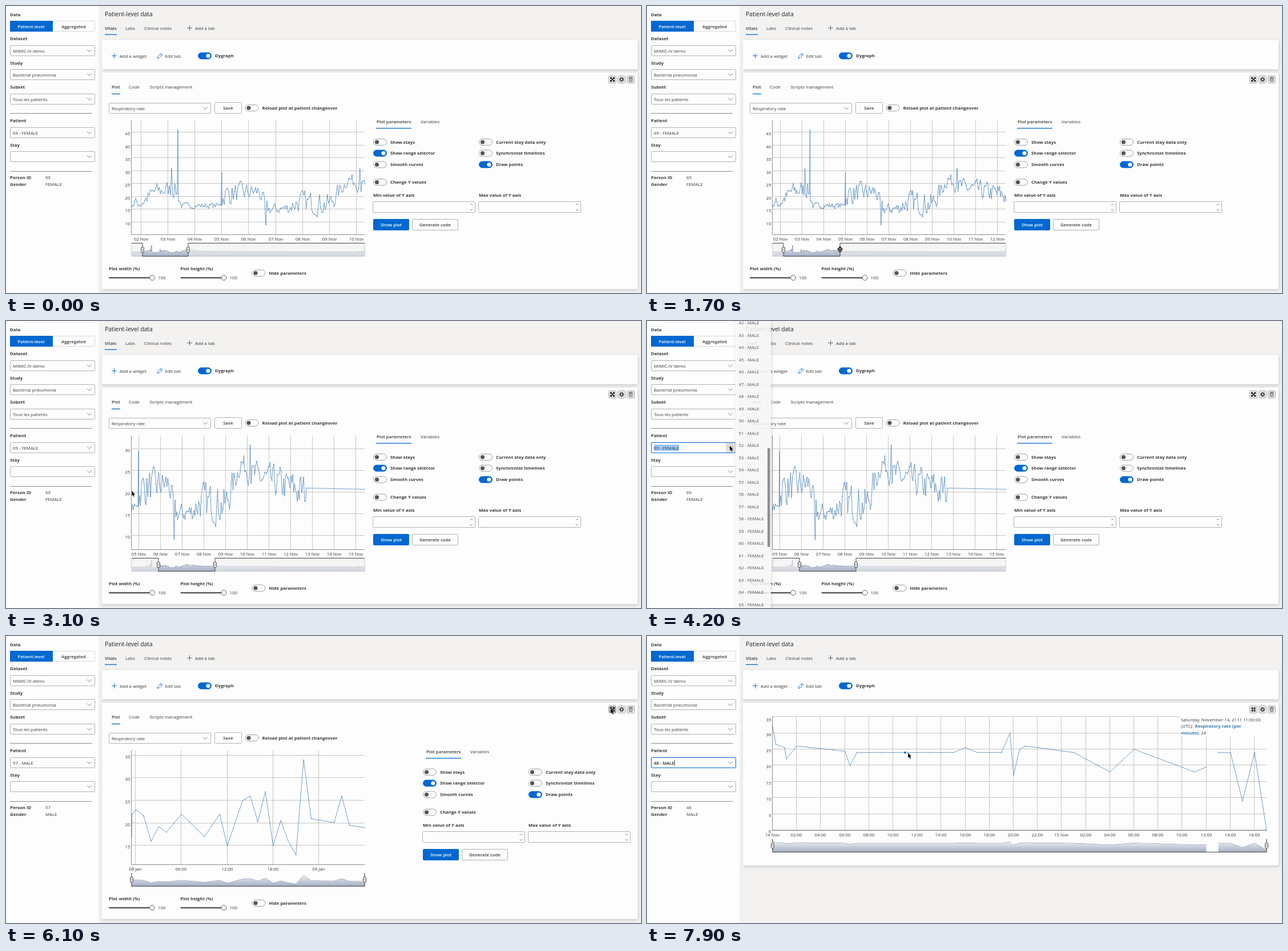
An HTML page with a canvas that plays this animation: 1112 by 504 pixels, repeating every 8000 ms.

```html
<!DOCTYPE html>
<html lang="en">
<head>
<meta charset="utf-8">
<title>Patient-level data</title>
<style>
html, body { margin: 0; overflow: hidden; }
canvas { display: block; }
</style>
</head>
<body>
<canvas width="1112" height="504"></canvas>
<script>
const ctx = document.querySelector('canvas').getContext('2d');
const INK = '#3b3a39', BLUE = '#0068d0', LINE = '#b2b1ae', PAPER = '#fdfdfd', SERIES = '#3478b6';
const LOOP = 8000, STEP = 100;

// Drawing helpers
function text(s, x, y, weight = 400, color = INK, align = 'left', size = 7.8) {
  ctx.font = `${weight} ${size}px "Open Sans", "Noto Sans", sans-serif`;
  ctx.fillStyle = color;
  ctx.textAlign = align;
  ctx.fillText(s, x, y + size * .36);
}
const bold = (s, x, y, color) => text(s, x, y, 700, color);
const semi = (s, x, y) => text(s, x, y, 600);
function rect(x, y, w, h, fill, stroke, radius = 0) {
  ctx.beginPath();
  ctx.roundRect(x, y, w, h, radius);
  if (fill) { ctx.fillStyle = fill; ctx.fill(); }
  if (stroke) { ctx.strokeStyle = stroke; ctx.stroke(); }
}
function lines(color, width, ...paths) {
  ctx.strokeStyle = color;
  ctx.lineWidth = width;
  ctx.beginPath();
  for (const p of paths)
    for (let i = 0; i < p.length; i += 2) ctx[i ? 'lineTo' : 'moveTo'](p[i], p[i + 1]);
  ctx.stroke();
  ctx.lineWidth = 1;
}
function dot(x, y, r, fill, stroke) {
  ctx.beginPath();
  ctx.arc(x, y, r, 0, 7);
  if (fill) { ctx.fillStyle = fill; ctx.fill(); }
  if (stroke) { ctx.strokeStyle = stroke; ctx.stroke(); }
}
function card(x, y, w, h) {
  ctx.save();
  ctx.shadowColor = 'rgba(0,0,0,.16)';
  ctx.shadowBlur = 5;
  ctx.shadowOffsetX = 1;
  ctx.shadowOffsetY = 2;
  rect(x, y, w, h, PAPER);
  ctx.restore();
}
const chevron = (x, y, s = 4, d = 1) =>
  lines('#605e5c', .8, [x - s, y - s * d / 2, x, y + s * d / 2, x + s, y - s * d / 2]);
const underline = (x, y, w) => rect(x, y, w, 1.3, BLUE);
const plus = (x, y, color) => lines(color, .9, [x - 4.5, y, x + 4.5, y], [x, y - 4.5, x, y + 4.5]);
function combo(x, y, w, value) {
  rect(x + .5, y + .5, w - 1, 18, PAPER, LINE, 1);
  text(value, x + 5, y + 9.7);
  chevron(x + w - 10, y + 9.5);
}
function button(s, x, y, w, primary) {
  rect(x + .5, y + .5, w - 1, 19, primary ? BLUE : PAPER, primary ? BLUE : LINE, 1);
  text(s, x + w / 2, y + 10, 600, primary ? '#fff' : INK, 'center');
}
function toggle(x, y, on, label) {
  rect(x + .5, y - 5.5, 23, 11, on ? BLUE : PAPER, on ? BLUE : '#a09f9d', 5.5);
  dot(x + (on ? 18 : 6.5), y, 3.6, on ? '#fff' : '#555');
  bold(label, x + 30, y);
}
function slider(x, label) {
  bold(label, x, 461);
  rect(x, 476, 72, 2.4, '#605e5c', null, 1);
  dot(x + 76, 477.2, 4.4, PAPER, '#605e5c');
  text('100', x + 86, 477.5);
}

// Motion helpers
const ramp = (t, a, b) => Math.min(1, Math.max(0, (t - a) / (b - a)));
// Linear interpolation through [position, ...values] keys
function track(keys, t) {
  const i = keys.findIndex(k => k[0] > t);
  if (i === 0) return keys[0].slice(1);
  if (i < 0) return keys.at(-1).slice(1);
  const a = keys[i - 1], b = keys[i], f = ramp(t, a[0], b[0]);
  return a.slice(1).map((v, j) => v + (b[j + 1] - v) * f);
}

// Hourly rates: a trend of [hour, mean, swing] with seeded noise, plus single peaks
let seed = 7;
const noise = () => (seed = seed * 16807 % 2147483647) / 1073741823.5 - 1;
function series(from, to, trend, peaks = {}) {
  const points = new Map();
  let drift = 0;
  for (let h = from; h <= to; h++) {
    const [mean, swing = 0] = track(trend, h);
    drift = drift * .3 + noise();
    points.set(h, mean + drift * swing);
  }
  for (const h in peaks) points.set(+h, peaks[h]);
  return [...points].sort((a, b) => a[0] - b[0]);
}
const patients = {
  69: { sex: 'FEMALE', day: 2, month: 'Nov', domain: [-58, 1002], parts: [[
    ...series(-58, 257, [[-58, 17, 3], [0, 17.5, 2], [12, 22, 3], [30, 23, 3], [36, 16.5, 1], [69, 16.5, 1],
      [75, 21, 4], [105, 22, 3], [113, 15, 2], [131, 15.5, 2], [140, 18, 4], [168, 17, 4],
      [185, 27, 2], [198, 24, 3], [256, 20, 4], [257, 21, 0]],
      { 27: 31, 32.6: 46, 71.8: 29.5, 111: 9, 195: 31 }),
    ...series(960, 1002, [[960, 18, 0], [965, 18, 4]])]] },
  57: { sex: 'MALE', day: 8, month: 'Jan', domain: [-.547, 30], parts: [
    series(0, 30, [[0, 23], [4, 18], [6, 22], [9, 17], [11, 22], [13, 20], [23, 21], [30, 19]],
      { '-0.547': 17, '-0.48': 22, 2: 16, 12: 15, 14: 25, 15: 26, 17: 27, 18: 15, 20: 16, 21: 13, 22: 34, 27: 26 })] },
  46: { sex: 'MALE', day: 14, month: 'Nov', domain: [0, 41], parts: [
    series(0, 36, [[0, 25], [2, 26], [7, 24], [19, 24], [21, 26], [25, 24], [28, 18], [30, 25], [35, 18], [36, 19.5]],
      { 0: 32, .27: 26.5, 1.14: 22, 6.42: 20, 16: 25.5, 19.7: 30, 20: 17, 20.5: 25 }),
    series(37, 41, [[38, 24], [39, 9], [40, 24], [41, 0]])] }
};
const extent = a => [Math.min(...a), Math.max(...a)];
const two = n => String(n).padStart(2, '0');

const pointer = [[1000, 335, 385], [1200, 319, 426], [1700, 338, 427], [1900, 317, 430], [2265, 345, 430],
  [3600, 145, 219], [4300, 145, 219], [5000, 172, 325], [6100, 1059, 127], [6600, 145, 220],
  [7000, 149, 328], [7200, 170, 345], [7900, 457, 205]];
// The right handle is dragged out first, then the whole window is panned
function rangeWindow(t) {
  const grow = 19 * ramp(t, 1200, 1700), pan = 28 * ramp(t, 1900, 2265);
  return [239 + pan, 319 + grow + pan];
}

function chart(p, x, y, w, [left, right], tick, hover) {
  const H = 200, [d0, d1] = p.domain;
  const hourAt = px => d0 + (px - x) / w * (d1 - d0);
  const from = hourAt(left), to = hourAt(right);
  const all = p.parts.flat(), seen = all.filter(d => d[0] >= from - 1 && d[0] <= to + 1).map(d => d[1]);
  const [min, max] = extent(seen), pad = (max - min) * .1;
  const lo = Math.max(0, min - pad), hi = max + pad;
  const X = h => x + (h - from) / (to - from) * w, Y = v => y + H - (v - lo) / (hi - lo) * H;

  for (let v = Math.ceil(lo / 5) * 5; v <= hi; v += 5) {
    const gy = Math.round(Y(v)) - .5;
    lines('#c6c6c1', 1, [x, gy, x + w, gy]);
    text(v, x - 2.5, Math.max(y + 6, gy + 2.5), 400, INK, 'right');
  }
  for (let h = Math.ceil(from / tick) * tick; h < to; h += tick) {
    const gx = Math.round(X(h)) - .5;
    lines('#c6c6c1', 1, [gx, y, gx, y + H]);
    const label = h % 24 ? two(h % 24) + ':00' : `${two(p.day + h / 24)} ${p.month}`;
    text(label, gx, y + H + 8.5, 400, INK, 'center');
  }
  lines('#8d8c94', 1, [x - .5, y, x - .5, y + H + .5, x + w, y + H + .5]);

  ctx.save();
  ctx.beginPath();
  ctx.rect(x - 1, y, w + 2, H + 1);
  ctx.clip();
  for (const part of p.parts) {
    lines(SERIES, .7, part.flatMap(([h, v]) => [X(h), Y(v)]));
    for (const [h, v] of part) dot(X(h), Y(v), .6, SERIES);
  }
  ctx.restore();

  // Range selector
  const top = y + 215.5, bottom = y + 238.5, [vMin, vMax] = extent(all.map(d => d[1]));
  const extra = (vMax - vMin) / 4;
  const mx = h => x + (h - d0) / (d1 - d0) * w;
  const my = v => bottom - (v - vMin + extra) / (vMax - vMin + 2 * extra) * (bottom - top);
  const shade = ctx.createLinearGradient(0, top, 0, bottom);
  shade.addColorStop(0, '#fff');
  shade.addColorStop(1, '#a2adc2');
  for (const part of p.parts) {
    lines('#7487a8', 1, part.flatMap(([h, v]) => [mx(h), my(v)]));
    ctx.lineTo(mx(part.at(-1)[0]), bottom);
    ctx.lineTo(mx(part[0][0]), bottom);
    ctx.fillStyle = shade;
    ctx.fill();
  }
  lines('#b8b8b8', 1, [x, top, x, bottom, x + w, bottom, x + w, top]);
  rect(x, top, left - x, bottom - top, 'rgba(240,240,240,.6)');
  rect(right, top, x + w - right, bottom - top, 'rgba(240,240,240,.6)');
  lines('#444', 1, [x, top, left, top, left, bottom, right, bottom, right, top, x + w, top]);
  for (const hx of [left, right]) {
    rect(hx - 2.5, top + 7, 5, 9, '#f4f4f4', '#555', 1.5);
    lines('#777', .6, [hx - .7, top + 9.5, hx - .7, top + 13.5], [hx + .8, top + 9.5, hx + .8, top + 13.5]);
  }

  if (hover) {
    const h = Math.round(hourAt(hover[0])), [v] = track(all, h);
    rect(933, 140, 152, 36, PAPER);
    text(`Saturday, November 14, 2111 ${two(h)}:00:00`, 935, 147);
    text('(UTC):', 935, 158.5);
    bold('Respiratory rate (per', 959.5, 158.5, SERIES);
    bold('minute)', 935, 170, SERIES);
    text(`: ${+v.toFixed(1)}`, 966, 170);
    dot(X(h), Y(v), 1.9, '#0060c0');
  }
}

function sidebar(id, open, focus) {
  rect(0, 0, 162, 504, PAPER);
  bold('Data', 7, 15);
  rect(7.5, 26.5, 148, 18, PAPER, '#d8d8d8', 1);
  rect(7, 26, 75, 19, BLUE);
  text('Patient-level', 44, 36, 600, '#fff', 'center');
  text('Aggregated', 118.5, 36, 600, INK, 'center');
  const name = `${id} - ${patients[id].sex}`;
  const fields = [['Dataset', 57.5, 'MIMIC-IV demo'], ['Study', 100, 'Bacterial pneumonia'],
    ['Subset', 142.5, 'Tous les patients'], ['Stay', 244, ''], ['Patient', 201.5, name]];
  for (const [label, y, value] of fields) {
    bold(label, 7, y);
    combo(7, Math.round(y + 11), 149, value);
  }
  if (focus) {
    text(name, 12, 222.7);
    const nameWidth = ctx.measureText(name).width;
    rect(7.5, 213.5, 148, 18, null, BLUE, 1);
    if (open) {
      rect(138, 214, 17, 17, '#dededd');
      chevron(146, 222.5);
      rect(12, 217, nameWidth, 11, '#9cc8f7');
      text(name, 12, 222.7);
    } else lines('#222', .8, [12.5 + nameWidth, 218, 12.5 + nameWidth, 228]);
  }
  lines('#8a8a88', 1, [7, 188.5, 150, 188.5], [7, 290.5, 150, 290.5]);
  bold('Person ID', 7, 301);
  bold('Gender', 7, 313);
  text(id, 69, 301);
  text(patients[id].sex, 69, 313);
}

function patientMenu(first, alpha, [px, py]) {
  ctx.save();
  ctx.globalAlpha = alpha;
  card(155, -10, 62, 530);
  for (let i = 0; i < 24; i++) {
    const n = first + i, y = 3.5 + i * 21.5;
    if (px > 157 && Math.abs(py - y) < 10.7) rect(156, y - 10.7, 55, 21.4, '#f0efee');
    text(`${n} - ${n < 58 ? 'MALE' : 'FEMALE'}`, 160.5, y);
  }
  rect(211, 223 + (first - 42) * 6.33, 4.5, 174, '#7d7d7d', null, 2);
  ctx.restore();
}

function toolIcons(full, hot) {
  [1055, 1071, 1087].forEach((x, i) =>
    rect(x + .5, 122.5, 13, 13, hot && !i ? '#aaa' : '#e3e2e4', '#b5b4b8', 2));
  for (const [sx, sy] of [[1, 1], [1, -1], [-1, 1], [-1, -1]]) {
    const q = d => [1062 + sx * d, 129 + sy * d], [a, b] = q(full ? 1.2 : 3.3), s = full ? 1 : -1;
    lines('#222', 1.4, [...q(full ? 1 : 0), ...q(3.5)], [a + sx * 2.2 * s, b, a, b, a, b + sy * 2.2 * s]);
  }
  for (let k = 0; k < 4; k++) {
    const c = Math.cos(k * Math.PI / 4) * 4, s = Math.sin(k * Math.PI / 4) * 4;
    lines('#222', 1.5, [1078 - c, 129 - s, 1078 + c, 129 + s]);
  }
  dot(1078, 129, 2.2, '#e3e2e4', '#222');
  rect(1091.5, 127, 5, 5.5, null, '#555', 1);
  lines('#555', .9, [1090, 126, 1098, 126], [1092.5, 124.8, 1095.5, 124.8], [1094, 128, 1094, 131.5]);
}

function header() {
  text('Patient-level data', 173, 14.5, 400, '#222', 'left', 10.4);
  semi('Vitals', 173, 39);
  text('Labs', 209, 39);
  text('Clinical notes', 242, 39);
  plus(321.5, 38.5, '#555');
  text('Add a tab', 331, 39);
  underline(173, 49.5, 21);
  card(168, 60, 938, 51);
  plus(189.5, 87.5, BLUE);
  text('Add a widget', 199, 88);
  lines(BLUE, .9, [265, 92, 266, 88.5, 271.5, 83, 274, 85.5, 268.5, 91, 265, 92], [270, 84.5, 272.5, 87]);
  text('Edit tab', 278.5, 88);
  toggle(336, 87.5, true, 'Dygraph');
}

function settings(dx) {
  semi('Plot', 185, 142.5);
  text('Code', 215, 142.5);
  text('Scripts management', 251.5, 142.5);
  underline(185, 153.8, 15);
  combo(180, 170, 179, 'Respiratory rate');
  button('Save', 365, 169, 48);
  toggle(418.5, 179, false, 'Reload plot at patient changeover');
  slider(180, 'Plot width (%)');
  slider(305.5, 'Plot height (%)');
  toggle(430.5, 469, false, 'Hide parameters');

  ctx.save();
  ctx.translate(dx, 0);
  semi('Plot parameters', 649, 203);
  text('Variables', 726, 203);
  underline(648, 214, 62);
  toggle(643, 239, false, 'Show stays');
  toggle(643, 258.5, true, 'Show range selector');
  toggle(643, 278.5, false, 'Smooth curves');
  toggle(643, 309.5, false, 'Change Y values');
  toggle(828, 239, false, 'Current stay data only');
  toggle(828, 258.5, false, 'Synchronize timelines');
  toggle(828, 278.5, true, 'Draw points');
  for (const [x, label] of [[643, 'Min value of Y axis'], [828, 'Max value of Y axis']]) {
    bold(label, x, 332);
    rect(x - .5, 343.5, 179, 19, PAPER, LINE, 1);
    chevron(x + 172, 348.5, 2.2, -1);
    chevron(x + 172, 358, 2.2);
  }
  button('Show plot', 643, 374, 63, true);
  button('Generate code', 711, 374, 81);
  ctx.restore();
}

function drawPointer(moving, [x, y]) {
  ctx.save();
  ctx.translate(x, y);
  if (moving) {
    for (let k = 0; k < 4; k++) {
      lines('#111', 1.2, [0, 0, 4.2, 0], [2.5, -1.7, 4.2, 0, 2.5, 1.7]);
      ctx.rotate(Math.PI / 2);
    }
  } else {
    lines('#fff', 1, [0, 0, 0, 9, 2, 7.2, 3.5, 10.4, 5, 9.8, 3.6, 6.6, 6.2, 6.4, 0, 0]);
    ctx.fillStyle = '#111';
    ctx.fill();
  }
  ctx.restore();
}

function draw(t) {
  const id = t < 5000 ? 69 : t < 7200 ? 57 : 46, patient = patients[id];
  const full = t >= 6200, late = t >= 6600;
  const open = t > 4000 && t < 5000 || t > 6600 && t < 7200;
  const focus = open || t >= 5000 && t < 5900 || t >= 7200;
  const at = track(pointer, t);
  rect(0, 0, 1112, 504, '#f3f2f1');
  header();
  card(168, 117, 938, full ? 286 : 380);
  toolIcons(full, !full && t >= 6100);
  if (full) {
    const inside = at[0] > 220 && at[1] > 141 && at[1] < 341;
    chart(patient, 220, 141, 865, [220, 1085], 2, id === 46 && inside && at);
  } else {
    settings(id === 69 ? 0 : 87);
    chart(patient, 220, 201, 408, id === 69 ? rangeWindow(t) : [220, 628], id === 69 ? 24 : 6);
  }
  sidebar(id, open, focus);
  if (open) patientMenu(late ? 30 : 42, ramp(t, late ? 6600 : 4000, late ? 6835 : 4235), at);
  if (t >= 1000) drawPointer(at[1] > 415, at);
}

function tick(now) {
  draw(Math.floor(now % LOOP / STEP) * STEP);
  requestAnimationFrame(tick);
}
requestAnimationFrame(tick);
</script>
</body>
</html>
```
